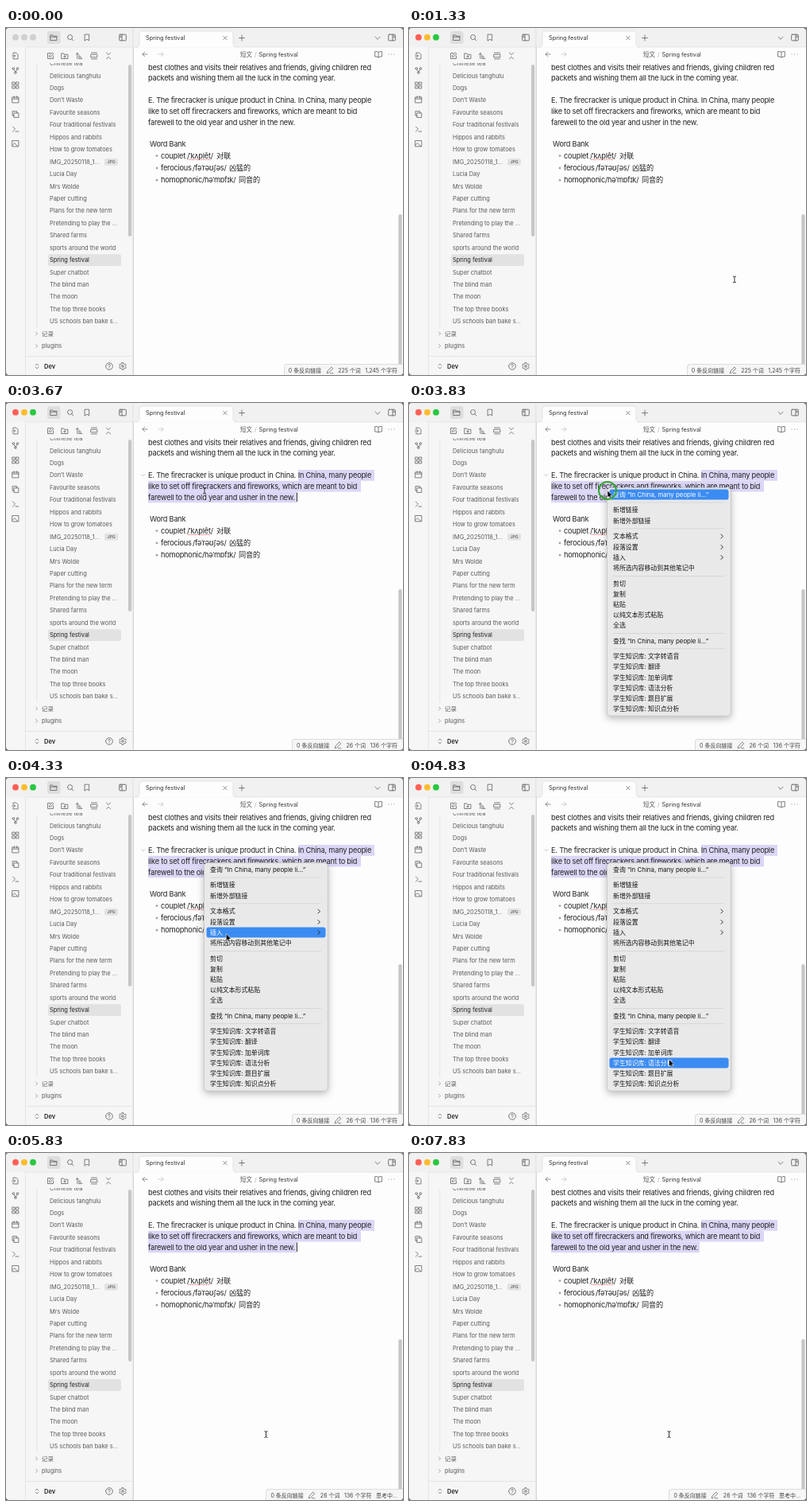
Recreate the animation shown at these times as an HTML page. Size 500 px wide and 436 px high, loop 8 s.

```html
<!DOCTYPE html>
<html lang="zh-CN">
<head>
<meta charset="utf-8">
<style>
  html, body { margin: 0; width: 100%; height: 100%; overflow: hidden; background: #555; }
  #window { position: relative; width: 500px; height: 436px; overflow: hidden; border-radius: 4px;
    font: 7px Inter, "Noto Sans CJK SC", "Noto Sans CJK", sans-serif; }
  svg { display: block; }
  text { white-space: pre; }
  .icon { fill: none; stroke: #5c5c5c; stroke-width: 1.8; stroke-linecap: round; stroke-linejoin: round; }
  .prose text { font-size: 9.2px; letter-spacing: -.022em; fill: #222; }
  #status { position: absolute; right: 0; bottom: 0; height: 13px; padding: 0 7px 0 5px; display: flex;
    align-items: center; gap: 5.5px; white-space: nowrap; color: #444; background: #f6f6f6;
    border: solid #dcdcdc; border-width: 1px 0 0 1px; border-radius: 4px 0 0 0; }
</style>
</head>
<body>
<div id="window">
  <svg id="stage" width="500" height="436" viewBox="0 0 500 436"></svg>
  <div id="status">
    <span>0 条反向链接</span>
    <svg class="icon" width="10" height="10" viewBox="0 0 24 24"><path d="M17 3l4 4L8 20l-5 1 1-5zM13 21h8"/></svg>
    <span id="words"></span><span id="chars"></span><span id="thinking">思考中...</span>
  </div>
</div>
<script>
const $ = id => document.getElementById(id);
const LOOP = 8000, FPS = 6;

const circle = (x, y, r) => `M${x - r} ${y}a${r} ${r} 0 1 0 ${2 * r} 0a${r} ${r} 0 1 0 ${-2 * r} 0`;
const FOLDER = 'M3 5h6l2 3h10v12H3z';
const PANEL = 'M5 4h14q2 0 2 2v12q0 2-2 2H5q-2 0-2-2V6q0-2 2-2z';
const ICONS = {
  folder: FOLDER + 'M3 10h18',
  folderPlus: FOLDER + 'M12 11v6M9 14h6',
  search: circle(11, 11, 7) + 'M21 21l-5-5',
  bookmark: 'M6 3h12v18l-6-4-6 4z',
  panelLeft: PANEL + 'M10 4v16M5.5 8h2M5.5 11h2',
  panelRight: PANEL + 'M14 4v16M16.5 8h2M16.5 11h2',
  down: 'M5 9l7 7 7-7',
  right: 'M9 5l7 7-7 7',
  close: 'M6 6l12 12M18 6L6 18',
  plus: 'M12 4v16M4 12h16',
  back: 'M20 12H4M11 5l-7 7 7 7',
  forward: 'M4 12h16M13 5l7 7-7 7',
  book: 'M12 6C9 4 6 4 2 4v15c4 0 7 0 10 2 3-2 6-2 10-2V4c-4 0-7 0-10 2v15',
  dots: 'M4 12h.1M12 12h.1M20 12h.1',
  edit: 'M12 4H4v16h16v-8M18 3l3 3-9 9H9v-3z',
  sort: 'M3 8l4-4 4 4M7 4v16M11 12h4M11 16h7M11 20h10',
  gallery: 'M3 8h18v8H3zM4 3h16M4 21h16',
  collapse: 'M6 3l6 6 6-6M6 21l6-6 6 6',
  fileIn: 'M5 8V3h9l5 5v13H5v-5M2 12h9M8 9l3 3-3 3',
  graph: circle(6, 6, 3) + circle(18, 6, 3) + circle(12, 18, 3) + 'M7 9l4 6M17 9l-4 6',
  grid: 'M3 3h7v7H3zM14 3h7v7h-7zM3 14h7v7H3zM14 14h7v7h-7z',
  calendar: 'M3 5h18v16H3zM3 10h18M8 2v5M16 2v5',
  copy: 'M8 8h13v13H8zM16 8V3H3v13h5',
  terminal: 'M4 5l7 7-7 7M12 19h9',
  image: 'M3 4h18v17H3zM3 17l6-6 9 9',
  updown: 'M7 15l5 5 5-5M7 9l5-5 5 5',
  help: circle(12, 12, 10) + 'M9 9a3 3 0 1 1 4 3l-1 2M12 17h.1',
  gear: circle(12, 12, 3) + 'M10 2h4l.6 3 2.6 1.5 2.8-1 2 3.5-2.2 2v2l2.2 2-2 3.5-2.8-1-2.6 1.5-.6 3h-4l-.6-3-2.6-1.5-2.8 1-2-3.5 2.2-2v-2l-2.2-2 2-3.5 2.8 1L9.4 5z',
};

const icon = (name, x, y, size = 10.4, attrs = '') =>
  `<path class="icon" d="${ICONS[name]}" transform="translate(${x - size / 2} ${y - size / 2}) scale(${size / 24})" ${attrs}/>`;
const icons = list => list.map(item => icon(...item)).join('');
const text = (x, y, str, size = 7.4, fill = '#5a5a5a', attrs = '') =>
  `<text x="${x}" y="${y}" font-size="${size}" fill="${fill}" ${attrs}>${str}</text>`;
const rect = (x, y, w, h, fill, r = 0, attrs = '') =>
  `<rect x="${x}" y="${y}" width="${w}" height="${h}" fill="${fill}" rx="${r}" ${attrs}/>`;

const FILES = ['Chinese tea', 'Delicious tanghulu', 'Dogs', 'Don’t Waste', 'Favourite seasons',
  'Four traditional festivals', 'Hippos and rabbits', 'How to grow tomatoes', 'IMG_20250118_1...',
  'Lucia Day', 'Mrs Wolde', 'Paper cutting', 'Plans for the new term', 'Pretending to play the ...',
  'Shared farms', 'sports around the world', 'Spring festival', 'Super chatbot', 'The blind man',
  'The moon', 'The top three books', 'US schools ban bake s...'];
const QUOTE = '“In China, many people li...”';
const MENU = [[115, '查询 ' + QUOTE], [134.5, '新增链接'], [148, '新增外部链接'],
  [167.5, '文本格式'], [181, '段落设置'], [194, '插入'], [207.5, '将所选内容移动到其他笔记中'],
  [227, '剪切'], [240, '复制'], [253, '粘贴'], [266, '以纯文本形式粘贴'], [279.5, '全选'],
  [299, '查找 ' + QUOTE],
  ...['文字转语音', '翻译', '加单词库', '语法分析', '题目扩展', '知识点分析']
    .map((name, i) => [318.3 + i * 13.25, '学生知识库: ' + name])];
const ROWS = [[368, 464], [179, 447], [179, 366]];   // selectable span of each text row
const ROW_TOP = 84, ROW_H = 13.75;

function sidebar() {
  const files = FILES.map((name, i) =>
    text(55, 47.2 + i * 15.43, name, 7.4, i == 16 ? '#222' : '#5a5a5a')).join('');
  return rect(0, 0, 160, 436, '#f6f6f6') + rect(0, 0, 500, 24, '#f1f1f1')
    + rect(24, 24, .7, 412, '#dedede') + rect(159.5, 0, .8, 436, '#dcdcdc')
    + [12, 23, 34].map(x => `<circle class="light" cx="${x}" cy="11.7" r="3.9"/>`).join('')
    + rect(52, 4, 16.5, 16, '#dedede', 3)
    + icons([['folder', 60, 12], ['search', 81, 12], ['bookmark', 102, 12], ['panelLeft', 147, 12, 11.5],
      ['edit', 56, 35], ['folderPlus', 74, 35], ['sort', 92, 35], ['gallery', 111, 35], ['collapse', 129, 35],
      ['fileIn', 12, 35], ['graph', 12, 53.5], ['grid', 12, 72], ['calendar', 12, 90],
      ['copy', 12, 108.5], ['terminal', 12, 127], ['image', 12, 145]])
    + `<clipPath id="list"><path d="M25 44h134v368H25z"/></clipPath><g clip-path="url(#list)">`
    + rect(38.5, 46, .7, 330, '#dcdcdc') + rect(53, 284.3, 92, 14.8, '#e2e2e2', 2.5) + files
    + rect(124, 164, 17, 8.6, '#e2e2e2', 2)
    + text(132.5, 170.2, 'JPG', 5.2, '#666', 'text-anchor="middle" font-weight="600"')
    + ['记录', 'plugins', '课文'].map((name, i) =>
      icon('right', 38.5, 384 + i * 15.43, 7) + text(45, 386.8 + i * 15.43, name)).join('')
    + '</g>' + rect(154, 46, 4.2, 216, '#c6c6c6', 2.1) + rect(25, 412, 135, .7, '#dedede')
    + icons([['updown', 39, 425, 9], ['help', 130, 425], ['gear', 147, 425]])
    + text(48, 427.9, 'Dev', 7.5, '#222', 'font-weight="600"');
}

function page() {
  const bullet = (y, word, x1, sound, x2, meaning) =>
    `<circle cx="190" cy="${y - 3}" r="1.4" fill="#a5a5a5"/>`
    + text(195, y, word) + text(x1, y, sound) + text(x2, y, meaning);
  return rect(160.3, 24, 340, 412, '#fdfdfd') + rect(24, 23.6, 476, .7, '#dedede')
    + '<path d="M163 24.4q5 0 5-5V8q0-4 4-4h110q4 0 4 4v11.4q0 5 5 5" fill="#fdfdfd"/>'
    + '<path d="M163 24q5 0 5-5V8q0-4 4-4h110q4 0 4 4v11q0 5 5 5" fill="none" stroke="#dcdcdc" stroke-width=".7"/>'
    + text(176, 14.8, 'Spring festival', 7.3, '#333')
    + icons([['close', 276, 12.5, 9], ['plus', 297, 12.5], ['down', 468, 12.5], ['panelRight', 486, 12, 11.5],
      ['back', 175, 33, 9], ['forward', 195, 33, 9, 'opacity=".4"'], ['book', 469, 33], ['dots', 485.5, 33]])
    + text(295, 36, '短文', 7.5) + text(313, 36, '/', 7.5, '#aaa') + text(318.5, 36, 'Spring festival', 7.3, '#333')
    + rect(494.3, 234, 4.4, 190, '#c6c6c6', 2.2) + '<g id="selection"></g>'
    + icon('down', 173, 90.5, 7, 'id="fold" opacity=".7"') + '<g class="prose">'
    + [[179, 0, 'best clothes and visits their relatives and friends, giving children red'],
      [179, 1, 'packets and wishing them all the luck in the coming year.'],
      [179, 3, 'E. The firecracker is unique product in China. In China, many people'],
      [179, 4, 'like to set off firecrackers and fireworks, which are meant to bid'],
      [179, 5, 'farewell to the old year and usher in the new.'],
      [181, 7, 'Word Bank']].map(([x, row, str]) => text(x, 52.6 + row * 13.78, str)).join('')
    + bullet(163.6, 'couplet', 228, '/ˈkʌplêt/', 265, '对联')
    + bullet(179, 'ferocious', 235, '/fəˈrəʊʃəs/', 281, '凶猛的')
    + bullet(194.2, 'homophonic', 247, '/həˈmɒfɪk/', 293, '同音的')
    + '</g><path d="M230 165.4h28" stroke="#e5484d" stroke-width="1" stroke-dasharray="1 1"/>'
    + rect(366, 112.5, .9, 11.5, '#222', 0, 'id="caret"');
}

function menu() {
  const lines = [124.7, 157.6, 217, 289.3, 308.5].map(y => rect(257, y, 140, .6, '#cacaca')).join('');
  return '<g id="menu">'
    + rect(249.4, 106.6, 156, 286.6, '#e9e9ea', 4.5, 'stroke="#bdbdbd" stroke-width=".7" style="filter:drop-shadow(0 3px 5px #0004)"')
    + lines + rect(252.5, 0, 150, 13, '#3b8cf2', 2.8, 'id="hover"')
    + MENU.map(([y, str]) => text(257, y + 2.9, str, 7.9, '#161616', 'class="item"')).join('')
    + [167.5, 181, 194].map(y => icon('right', 394, y, 8.5, 'style="stroke:#222;stroke-width:2.6"')).join('') + '</g>';
}

$('stage').innerHTML = sidebar() + page() + menu() + `<g id="mouse">
  <circle id="ring" fill="none" stroke-width="2"/>
  <path id="arrow" d="M0 0v9l2-1.8 1.4 3 1.5-.7-1.4-2.9h2.8z" stroke="#fff" stroke-width=".6"/>
  <path id="beam" d="M-2-4q2 0 2 1.5v5q0 1.5-2 1.5M2-4q-2 0-2 1.5M0 2.5q0 1.5 2 1.5" fill="none" stroke="#222" stroke-width=".9"/></g>`;

const lights = [...document.querySelectorAll('.light')];
const items = [...document.querySelectorAll('.item')];
const show = (id, on) => $(id).style.display = on ? '' : 'none';

// time, x, y
const PATH = [[1000, 425, 395], [2000, 367, 90], [2500, 367.5, 90.5], [2833, 445, 93], [3167, 368, 119],
  [3333, 366, 118], [3667, 250, 110], [4000, 250, 110], [4833, 327.5, 353.5]];

function mouseAt(t) {
  const next = PATH.findIndex(key => key[0] > t);
  if (next < 1) return PATH.at(next).slice(1);
  const [t0, x0, y0] = PATH[next - 1], [t1, x1, y1] = PATH[next];
  const p = (t - t0) / (t1 - t0), ease = p * p * (3 - 2 * p);
  return [x0 + (x1 - x0) * ease, y0 + (y1 - y0) * ease];
}

function select(t, x, y) {
  const done = t > 3160;
  const last = done ? 2 : Math.max(0, Math.min(2, Math.floor((y - ROW_TOP) / ROW_H)));
  let picked = 0, total = 0, shapes = '';
  ROWS.forEach(([from, to], row) => {
    total += to - from;
    if (t <= 2510 || row > last) return;
    const end = row < last || done ? to : Math.max(from, Math.min(to, x));
    picked += end - from;
    shapes += rect(from, ROW_TOP + row * ROW_H, end - from, ROW_H, '#dcd6f6');
  });
  $('selection').innerHTML = shapes;
  const part = picked / total;
  $('words').textContent = `${part ? Math.ceil(26 * part) : 225} 个词`;
  $('chars').textContent = `${part ? Math.ceil(136 * part) : '1,245'} 个字符`;
}

function render(t) {
  const [x, y] = mouseAt(t);
  const menuOpen = t > 3820 && t < 5660;
  const dragging = t > 2490 && t < 3160, rightClick = menuOpen && t < 3990, choosing = menuOpen && t > 5490;

  lights.forEach((light, i) => light.setAttribute('fill', t < 160 ? '#d0d0d0' : ['#fe5f57', '#febc2e', '#28c840'][i]));
  select(t, x, y);
  show('fold', t > 1990 && t < 5660);
  const blinkFrom = t < 5660 ? 3166 : 5666;
  show('caret', t > 3160 && (menuOpen || (t - blinkFrom) % 1200 < 600));
  show('thinking', t > 5660);

  show('menu', menuOpen);
  const hovered = MENU.findIndex(([cy]) => Math.abs(cy - y) < 6.6);
  show('hover', hovered >= 0);
  if (hovered >= 0) $('hover').setAttribute('y', MENU[hovered][0] - 6.5);
  items.forEach((item, i) => item.setAttribute('fill', i == hovered ? '#fff' : '#161616'));

  show('mouse', t > 990);
  $('mouse').setAttribute('transform', `translate(${x} ${y})`);
  show('arrow', menuOpen);
  show('beam', !menuOpen);
  show('ring', dragging || rightClick || choosing);
  $('ring').setAttribute('r', rightClick ? 11 : 8.5);
  $('ring').setAttribute('stroke', rightClick ? '#36a631' : '#111');
}

function tick(now) {
  const step = Math.floor((now % LOOP + 10) * FPS / 1000);
  render(step * 1000 / FPS % LOOP);
  requestAnimationFrame(tick);
}
render(0);
requestAnimationFrame(tick);
</script>
</body>
</html>
```
